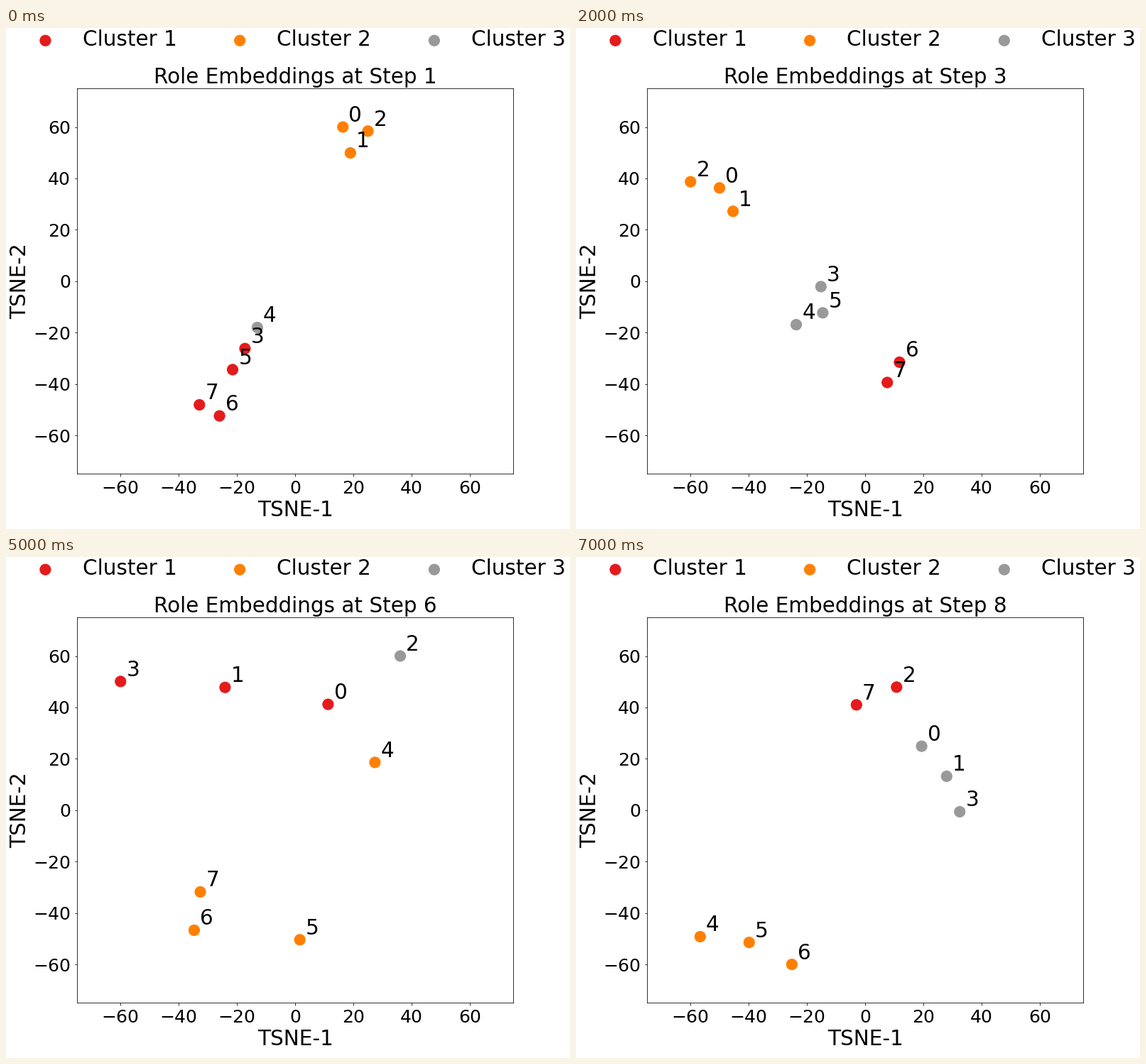
A matplotlib script for the animation above (8 s loop, 794 px wide and 706 px high).

```python
from itertools import cycle

import matplotlib.pyplot as plt
import numpy as np
from matplotlib.animation import FuncAnimation

W, H, DPI = 794, 706, 72
COLORS = {"1": "#e41a1c", "2": "#ff7f00", "3": "#999999"}
FONT, TICK_FONT = 29.5, 25
DOT = 230
REACH = 60  # farthest coordinate of a blended step

# Chains of roles per step: roles, clusters, first point, last point, bend
CHAINS = {
    1: [("012", "2", 16.4 + 60j, 25 + 58.4j, -1.08),
        ("435", "311", -13 - 18j, -21.5 - 34.4j, 0),
        ("67", "1", -26 - 52.4j, -32.9 - 48.1j, 0)],
    3: [("201", "2", -60 + 38.7j, -45.4 + 27.2j, 0.23),
        ("354", "3", -15.2 - 2.1j, -23.7 - 16.9j, 0.33),
        ("67", "1", 11.8 - 31.5j, 7.6 - 39.4j, 0)],
    5: [("02", "1", -60 + 60j, -31.9 + 57.5j, 0),
        ("134", "3", 7.6 + 30.9j, -9.6 + 9.4j, 0.12),
        ("567", "2", 26.5 - 21.7j, 53.2 - 29.1j, -0.44)],
    6: [("310", "1", -60 + 50.1j, 11.3 + 41.2j, 0.03),
        ("24", "32", 36.1 + 60j, 27.4 + 18.6j, 0),
        ("5", "2", 1.6 - 50.4j, 1.6 - 50.4j, 0),
        ("67", "2", -34.7 - 46.7j, -32.6 - 31.8j, 0)],
    7: [("465", "1", -11 + 44.9j, -0.4 + 19.6j, 0),
        ("31", "2", 4.2 + 6.6j, 8.6 - 17.3j, 0),
        ("027", "3", 7.6 - 28.2j, -14.8 - 60j, 0.21)],
    8: [("72", "1", -3 + 41j, 10.8 + 47.9j, 0),
        ("456", "2", -56.7 - 49.2j, -25.2 - 60j, 0.1),
        ("013", "3", 19.4 + 24.9j, 32.5 - 0.6j, 0.08)],
}


def layout(step):
    """Complex positions and colours of the eight roles."""
    if step not in CHAINS:
        before, colors = layout(step - 1)
        mean = (before + layout(step + 1)[0]) / 2
        widest = max(abs(mean.real).max(), abs(mean.imag).max())
        return mean * REACH / widest, colors
    spots, colors = np.zeros(8, complex), [None] * 8
    for roles, clusters, start, end, bend in CHAINS[step]:
        ts = np.linspace(0, 1, len(roles))
        for role, cluster, t in zip(roles, cycle(clusters), ts):
            sideways = 4j * bend * t * (1 - t)
            spots[int(role)] = start + (end - start) * (t + sideways)
            colors[int(role)] = COLORS[cluster]
    return spots, colors


plt.rcParams["font.family"] = "DejaVu Sans"
fig = plt.figure(figsize=(W / DPI, H / DPI), dpi=DPI, facecolor="white")

# Plot area in pixels, measured from the top left
left, right, top, bottom = 99.8, 714.4, 85.2, 628.45
ax = fig.add_axes([left / W, 1 - bottom / H,
                   (right - left) / W, (bottom - top) / H])
ax.set(xlim=(-75, 75), ylim=(-75, 75))
ax.set_xticks(range(-60, 61, 20))
ax.set_yticks(range(-60, 61, 20))
ax.tick_params(labelsize=TICK_FONT, pad=5.5)
ax.set_xlabel("TSNE-1", fontsize=FONT)
ax.set_ylabel("TSNE-2", fontsize=FONT)
title = ax.set_title("", fontsize=FONT, pad=7)

# Legend row on a pixel-sized overlay
row = fig.add_axes([0, 0, 1, 1])
row.set(xlim=(0, W), ylim=(H, 0))
row.axis("off")
legend_x = 55.4 + 273.75 * np.arange(3)
row.scatter(legend_x, [17.7] * 3, s=DOT, c=list(COLORS.values()))
for x, number in zip(legend_x, COLORS):
    row.text(x + 52.2, 25.2, f"Cluster {number}", fontsize=FONT)

dots = ax.scatter([0] * 8, [0] * 8, s=DOT, c=["white"] * 8)
labels = [ax.text(0, 0, str(i), fontsize=FONT) for i in range(8)]


def draw(frame):
    step = frame + 1
    spots, colors = layout(step)
    title.set_text(f"Role Embeddings at Step {step}")
    dots.set_offsets(np.column_stack([spots.real, spots.imag]))
    dots.set_color(colors)
    for label, spot in zip(labels, spots):
        label.set_position((spot.real + 2, spot.imag + 2.1))
    return [title, dots, *labels]


anim = FuncAnimation(fig, draw, frames=8, interval=1000,
                     repeat=True, repeat_delay=0, blit=False)
plt.show()
```
